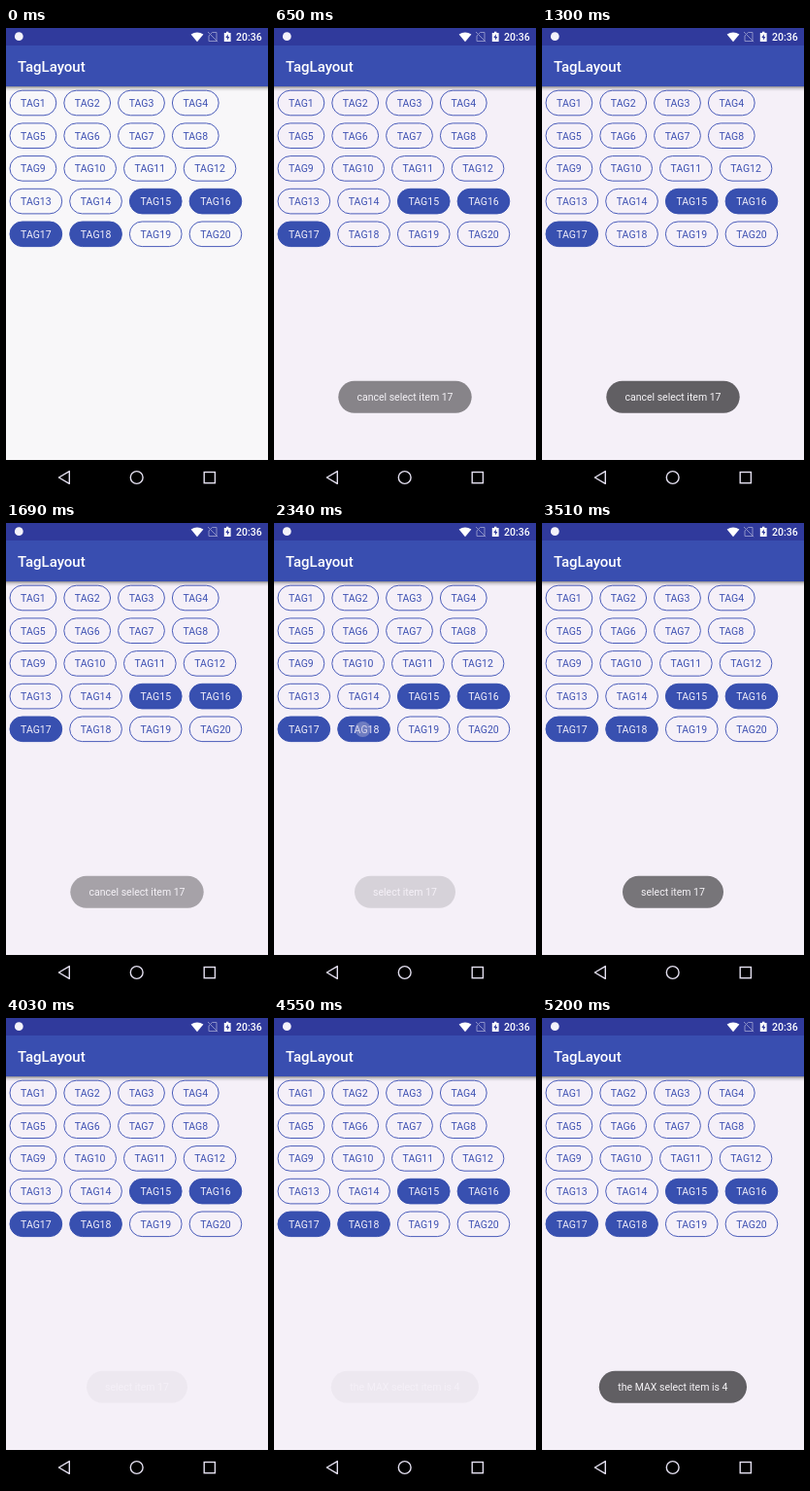
An HTML page that plays this animation: 270x480 px, repeating every 5.33 s.

```html
<!DOCTYPE html>
<html lang="en">
<head>
<meta charset="utf-8">
<title>TagLayout</title>
<style>
  html, body { margin: 0; width: 100%; height: 100%; overflow: hidden; background: #000; }
  svg { display: block; width: 270px; height: 480px; }
  text { font: 10.5px Roboto, "Open Sans", sans-serif; }
  .tag rect { fill: none; stroke: #4a5cba; }
  .tag text { fill: #3d50b2; text-anchor: middle; }
  .tag.on rect { fill: #3850b0; stroke: #3850b0; }
  .tag.on text { fill: #f4f0fa; }
  .toast rect { fill: #615f63; }
  .toast text { fill: #f6f4f7; text-anchor: middle; }
</style>
</head>
<body>
<svg id="stage" viewBox="0 0 270 480">
  <defs>
    <linearGradient id="shade" x1="0" y1="0" x2="0" y2="1">
      <stop offset="0" stop-color="#000" stop-opacity=".42"/>
      <stop offset=".45" stop-color="#000" stop-opacity=".14"/>
      <stop offset="1" stop-color="#000" stop-opacity="0"/>
    </linearGradient>
  </defs>
  <rect id="page" width="270" height="444"/>
  <rect y="60" width="270" height="5" fill="url(#shade)"/>

  <!-- status bar -->
  <rect width="270" height="18" fill="#303a9c"/>
  <circle cx="13.3" cy="8.7" r="4.4" fill="#f4f2fa"/>
  <path d="M190.6 6.6Q197 2.2 203.4 6.6L197 14.2Z" fill="#fff"/>
  <path d="M217 4.5V13.5H209V8L212.5 4.5ZM208 4L218.2 14.2" fill="none" stroke="#8b90c8"/>
  <path d="M227 3.8H229.4V5H231.6V14H224.8V5H227Z" fill="#fff"/>
  <path d="M228.8 6.3L226.3 10H228V12.6L230.4 8.9H228.8Z" fill="#303a9c"/>
  <text x="237" y="12.9" fill="#fff" font-weight="500" style="font-weight:500">20:36</text>

  <!-- app bar -->
  <rect y="18" width="270" height="42" fill="#394eb0"/>
  <text x="12" y="45.2" fill="#fff" style="font-size:15px;font-weight:500">TagLayout</text>

  <g id="tags"></g>
  <circle id="touch" cx="91.5" cy="212" r="8" fill="#b4b4d6" fill-opacity=".45"/>
  <g id="toasts"></g>

  <!-- navigation bar -->
  <rect y="444" width="270" height="36" fill="#000"/>
  <g fill="none" stroke="#e4e0f0" stroke-width="1.4">
    <path d="M65.3 455.6V468.4L54.4 462Z" stroke-linejoin="round"/>
    <circle cx="134.7" cy="462" r="6.4"/>
    <rect x="204.2" y="456.5" width="11.2" height="11.2"/>
  </g>
</svg>
<script>
const LOOP = 5330, STEP = 130, FADE = 650;
const DESELECT = 190, SELECT = 2210, TOUCH_END = 2470;
const toastTable = [
  { text: "cancel select item 17", x: 66.3, w: 137.4, from: 170, out: 1385 },
  { text: "select item 17", x: 83, w: 104, from: SELECT, out: 3410 },
  { text: "the MAX select item is 4", x: 58.8, w: 152.2, from: 4520, out: LOOP }
];
const $ = id => document.getElementById(id);

function add(parent, name, attrs, text = "") {
  const el = document.createElementNS("http://www.w3.org/2000/svg", name);
  for (const key in attrs) el.setAttribute(key, attrs[key]);
  el.textContent = text;
  parent.append(el);
  return el;
}

function pill(parent, kind, x, y, w, h, label) {
  const g = add(parent, "g", { class: kind });
  add(g, "rect", { x, y, width: w, height: h, rx: h / 2 });
  add(g, "text", { x: x + w / 2, y: y + h / 2 + 3.8 }, label);
  return g;
}

const tags = [];
for (let row = 0; row < 5; row++) {
  let x = 4;
  for (let col = 0; col < 4; col++) {
    const n = row * 4 + col + 1;
    const w = n < 10 ? 47.8 : 53.7;
    const tag = pill($("tags"), "tag", x, 64.2 + row * 33.7, w, 25.6, "TAG" + n);
    tag.classList.toggle("on", n >= 15 && n <= 18);
    tags.push(tag);
    x += w + 8;
  }
}

const toasts = toastTable.map(t => pill($("toasts"), "toast", t.x, 362.8, t.w, 33, t.text));
const clamp = v => Math.max(0, Math.min(1, v));

function draw(now) {
  const t = Math.floor(now % LOOP / STEP) * STEP;
  $("page").setAttribute("fill", t < DESELECT ? "#f8f7f9" : "#f5f0f8");
  tags[17].classList.toggle("on", t < DESELECT || t >= SELECT);
  $("touch").setAttribute("opacity", t >= SELECT && t < TOUCH_END ? 1 : 0);
  toastTable.forEach(({ from, out }, i) => {
    const shown = Math.min(clamp((t - from) / FADE), clamp(1 - (t - out) / FADE));
    toasts[i].setAttribute("opacity", shown);
  });
}

const start = performance.now();
function tick() {
  draw(performance.now() - start);
  requestAnimationFrame(tick);
}
tick();
</script>
</body>
</html>
```
